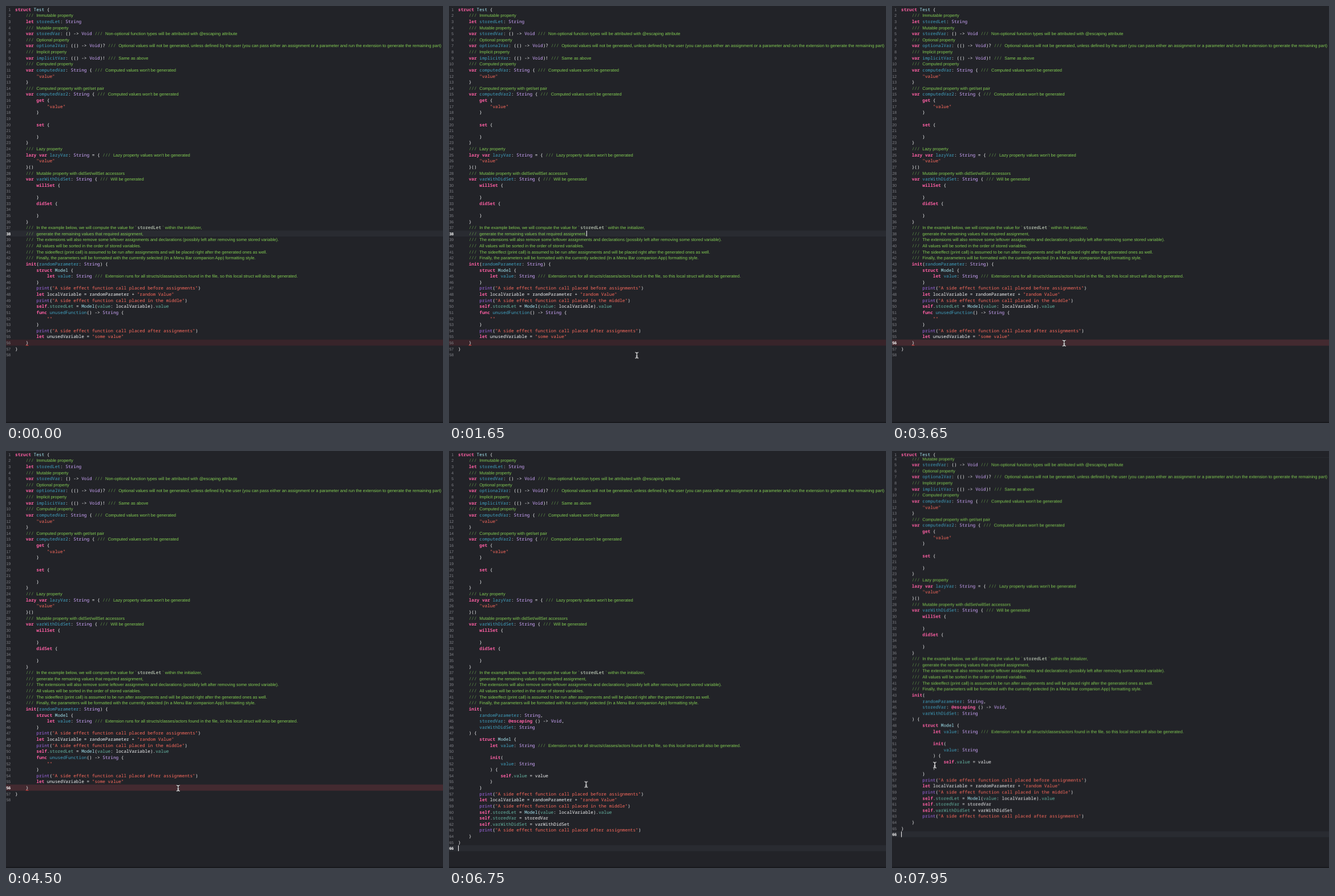
Recreate the animation shown at these times as an HTML page. Size 766 px wide and 731 px high, loop 8 s.

```html
<!DOCTYPE html>
<html lang="en">
<head>
<meta charset="utf-8">
<title>Initializer generation</title>
<style>
html, body { margin: 0; width: 100%; height: 100%; overflow: hidden; background: #222328; }
svg { display: block; width: 766px; height: 731px; }
text {
  font: 500 7.74px "Noto Sans Mono", "DejaVu Sans Mono", monospace;
  text-rendering: geometricPrecision;
  fill: #f1f2f3;
}
.number { font: 7px "Liberation Sans", Arial, sans-serif; fill: #808288; text-anchor: end; }
.number.bright { font-weight: 700; fill: #fff; }
.keyword { fill: #fc5fa3; font-weight: 700; }
.string { fill: #fc6a5d; }
.type { fill: #d0a8ff; }
.call { fill: #a167e6; }
.typeName { fill: #a5e6f2; }
.member { fill: #67b7a4; }
.declared { fill: #41a1c0; }
.slashes { fill: #5f9148; font-weight: 400; }
.comment { font: 7.5px "Liberation Sans", Arial, sans-serif; fill: #82cc52; }
.inline { fill: #dcecd2; }

.until-click, .until-run, .click-to-run, .after-run, .header { animation: 8s step-end infinite; }
.until-click { animation-name: untilClick; }
.until-run { animation-name: untilRun; }
.click-to-run { animation-name: clickToRun; }
.after-run { animation-name: afterRun; }
.header { animation-name: header; }
@keyframes untilClick { 0% { opacity: 1 } 36.25%, 100% { opacity: 0 } }
@keyframes untilRun { 0% { opacity: 1 } 57.5%, 100% { opacity: 0 } }
@keyframes clickToRun { 0% { opacity: 0 } 36.25% { opacity: 1 } 57.5%, 100% { opacity: 0 } }
@keyframes afterRun { 0% { opacity: 0 } 57.5%, 100% { opacity: 1 } }
@keyframes header { 0% { opacity: 0 } 85.625%, 100% { opacity: 1 } }

.caret { fill: #fff; animation: blink 1s step-end infinite; }
@keyframes blink { 0% { opacity: 1 } 50%, 100% { opacity: 0 } }

#page { animation: scroll 8s ease-out infinite; }
@keyframes scroll {
  0%, 85.625% { transform: translateY(0) }
  93.125%, 100% { transform: translateY(-24.4px) }
}

#pointer { animation: move 8s linear infinite; }
@keyframes move {
  0%, 8.125% { transform: translate(376px, 709px) }
  10.625% { transform: translate(361px, 668px) }
  12.5% { transform: translate(354.5px, 636.5px); animation-timing-function: ease-out }
  21.25% { transform: translate(329px, 612px) }
  29.375% { transform: translate(320.5px, 602.5px) }
  31.875%, 57.5% { transform: translate(301.7px, 591px) }
  66.875%, 74% { transform: translate(301px, 590.5px) }
  84.375% { transform: translate(240.5px, 584.5px) }
  97%, 100% { transform: translate(75px, 550.5px) }
}
#arrow { animation: arrow 8s step-end infinite; }
#beam { animation: beam 8s step-end infinite; }
@keyframes arrow { 0% { opacity: 0 } 8.125% { opacity: 1 } 16.25%, 100% { opacity: 0 } }
@keyframes beam { 0% { opacity: 0 } 16.25%, 100% { opacity: 1 } }
</style>
</head>
<body>
<svg viewBox="0 0 766 731">
  <g id="page"></g>
  <g id="header" class="header"></g>
  <rect y="729" width="766" height="2" fill="#18191d"/>
  <g id="pointer">
    <path id="arrow" d="M0 0V9.2L2.2 7.2L3.7 10.4L5.2 9.7L3.8 6.7H6.7Z" fill="#111" stroke="#fff" stroke-width=".9"/>
    <g id="beam" fill="none">
      <path d="M-3 -5Q0 -5 0 -3Q0 -5 3 -5M0 -4V4M-3 5Q0 5 0 3Q0 5 3 5M-1.5 1.5H1.5" stroke="#15161a" stroke-width="2.4"/>
      <path d="M-3 -5Q0 -5 0 -3Q0 -5 3 -5M0 -4V4M-3 5Q0 5 0 3Q0 5 3 5M-1.5 1.5H1.5" stroke="#fff" stroke-width="1.2"/>
    </g>
  </g>
</svg>
<script>
const shared = `struct Test {
    /// Immutable property
    let storedLet: String
    /// Mutable property
    var storedVar: () -> Void /// Non-optional function types will be attributed with @escaping attribute
    /// Optional property
    var optionalVar: (() -> Void)? /// Optional values will not be generated, unless defined by the user (you can pass either an assignment or a parameter and run the extension to generate the remaining part)
    /// Implicit property
    var implicitVar: (() -> Void)! /// Same as above
    /// Computed property
    var computedVar: String { /// Computed values won't be generated
        "value"
    }
    /// Computed property with get/set pair
    var computedVar2: String { /// Computed values won't be generated
        get {
            "value"
        }

        set {

        }
    }
    /// Lazy property
    lazy var lazyVar: String = { /// Lazy property values won't be generated
        "value"
    }()
    /// Mutable property with didSet/willSet accessors
    var varWithDidSet: String { /// Will be generated
        willSet {

        }
        didSet {

        }
    }
    /// In the example below, we will compute the value for \`storedLet\` within the initializer,
    /// generate the remaining values that required assignment,
    /// The extensions will also remove some leftover assignments and declarations (possibly left after removing some stored variable).
    /// All values will be sorted in the order of stored variables.
    /// The sideeffect (print call) is assumed to be run after assignments and will be placed right after the generated ones as well.
    /// Finally, the parameters will be formatted with the currently selected (In a Menu Bar companion App) formatting style.`;

const before = `    init(randomParameter: String) {
        struct Model {
            let value: String /// Extension runs for all structs/classes/actors found in the file, so this local struct will also be generated.
        }
        print("A side effect function call placed before assignments")
        let localVariable = randomParameter + "random Value"
        print("A side effect function call placed in the middle")
        self.storedLet = Model(value: localVariable).value
        func unusedFunction() -> String {
            ""
        }
        print("A side effect function call placed after assignments")
        let unusedVariable = "some value"
    }
}`;

const after = `    init(
        randomParameter: String,
        storedVar: @escaping () -> Void,
        varWithDidSet: String
    ) {
        struct Model {
            let value: String /// Extension runs for all structs/classes/actors found in the file, so this local struct will also be generated.

            init(
                value: String
            ) {
                self.value = value
            }
        }
        print("A side effect function call placed before assignments")
        let localVariable = randomParameter + "random Value"
        print("A side effect function call placed in the middle")
        self.storedLet = Model(value: localVariable).value
        self.storedVar = storedVar
        self.varWithDidSet = varWithDidSet
        print("A side effect function call placed after assignments")
    }
}`;

const LEFT = 16.1, COLUMN = 4.644, ROW = 10.625;
const TOKEN = new RegExp([
  '(?<comment>///.*)',
  '(?<string>"[^"]*")',
  '(?<keyword>\\b(?:struct|let|var|lazy|get|set|willSet|didSet|init|self|func)\\b|@escaping)',
  '(?<type>\\b(?:String|Void)\\b)',
  '(?<call>\\bprint\\b)',
  '(?<member>(?<=\\.)\\w+|(?<=Model\\()\\w+)',
  '(?<typeName>\\b(?:Test|Model)\\b)',
  '(?<declared>\\w+(?=:)|unusedFunction)',
  '\\w+|[^\\w\\s"/@]+'
].join('|'), 'g');

const page = document.getElementById('page');
const columnX = column => LEFT + column * COLUMN;
const baseline = line => 8.7 + (line - 1) * ROW;

function add(parent, tag, attributes, content = '') {
  const node = document.createElementNS('http://www.w3.org/2000/svg', tag);
  for (const [key, value] of Object.entries(attributes)) node.setAttribute(key, value);
  node.textContent = content;
  return parent.appendChild(node);
}

const layer = name => add(page, 'g', { class: name });

function addNumber(parent, line, bright = '') {
  add(parent, 'text', { class: `number ${bright}`, x: 8.2, y: baseline(line) }, line);
}

function addRow(parent, line, fill) {
  add(parent, 'rect', { y: baseline(line) - 8.3, width: 766, height: ROW, fill });
}

function addComment(row, text, column) {
  add(row, 'tspan', { class: 'slashes', x: columnX(column) }, '///');
  const [start, name, end] = text.slice(4).split('`');
  const tick = name ? '`' : '';
  add(row, 'tspan', { class: 'comment', x: columnX(column + 4) }, start + tick);
  if (!name) return;
  add(row, 'tspan', { class: 'inline', dx: 1.5 }, name);
  add(row, 'tspan', { class: 'comment', dx: 2.2 }, tick + end);
}

function addCode(parent, source, firstLine) {
  source.split('\n').forEach((code, i) => {
    const row = add(parent, 'text', { y: baseline(firstLine + i) });
    for (const match of code.matchAll(TOKEN)) {
      const kind = Object.keys(match.groups).find(key => match.groups[key]) || 'plain';
      if (kind === 'comment') addComment(row, match[0], match.index);
      else add(row, 'tspan', { class: kind, x: columnX(match.index) }, match[0]);
    }
  });
}

function addFocus(name, line, fill, caretX, blinkDelay) {
  const group = layer(name);
  addRow(group, line, fill);
  addNumber(group, line, 'bright');
  add(group, 'rect', {
    class: 'caret', x: caretX, y: baseline(line) - 8, width: 1, height: 10,
    style: `animation-delay: ${blinkDelay}ms`
  });
}

addRow(layer('until-run'), 56, '#38242a');
const numbers = layer('numbers');
const extraNumbers = layer('after-run');
for (let line = 1; line <= 66; line++) addNumber(line > 58 ? extraNumbers : numbers, line);

addFocus('until-click', 38, '#292b31', 240.8, -800);
addFocus('click-to-run', 56, '#432a30', columnX(5), -100);
addFocus('after-run', 66, '#292b31', columnX(0), -400);

addCode(layer('shared'), shared, 1);
const beforeLayer = layer('until-run');
addCode(beforeLayer, before, 43);
add(beforeLayer, 'rect', { x: columnX(4), y: baseline(56) + 1.2, width: 4.6, height: 1, fill: '#f0453f' });
addCode(layer('after-run'), after, 43);

const header = document.getElementById('header');
add(header, 'rect', { width: 766, height: 11, fill: '#222328' });
add(header, 'rect', { y: 11, width: 766, height: .6, fill: '#2d2f35' });
addNumber(header, 1);
addCode(header, 'struct Test {', 1);
</script>
</body>
</html>
```
